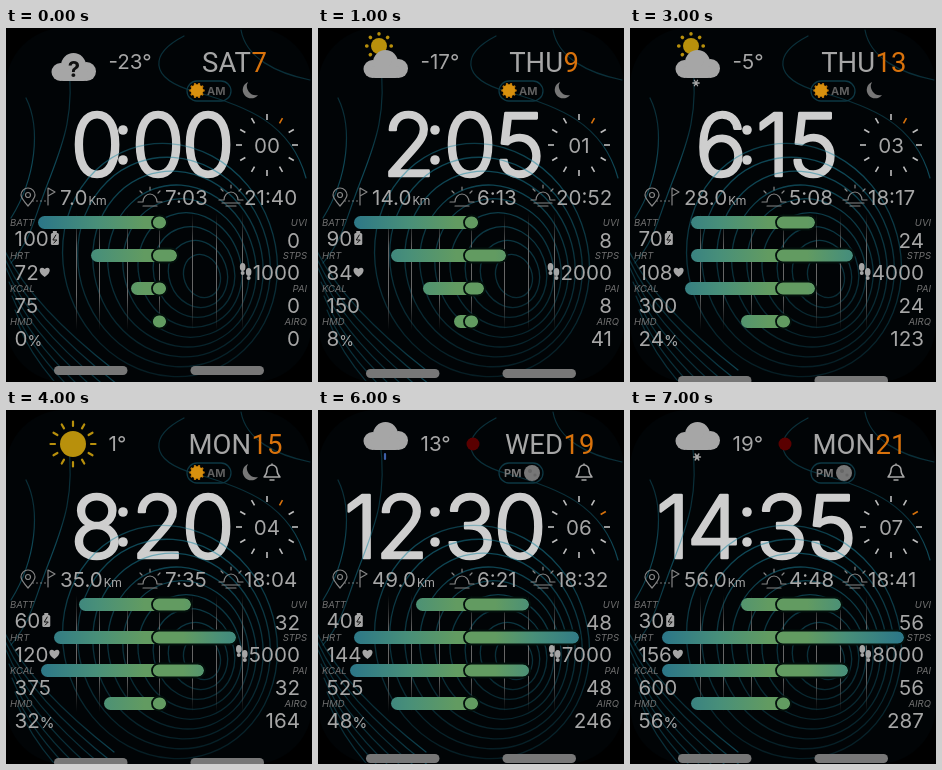
Animation of 306x354 px, one loop 8000 ms. Source, as an HTML page with a canvas:

```html
<!DOCTYPE html>
<html lang="en">
<head>
<meta charset="utf-8">
<style>
  html, body { margin: 0; width: 100%; height: 100%; overflow: hidden; background: #000; }
  canvas { display: block; width: 306px; height: 354px; }
</style>
</head>
<body>
<canvas width="306" height="354"></canvas>
<script>
const canvas = document.querySelector('canvas');
const ctx = canvas.getContext('2d');
const TAU = Math.PI * 2;
const GRAY = '#a6a6a6', DIM = '#858585', YELLOW = '#b8900c', WHITE = '#cecece';

// Values that follow no simple step, one entry per second
const days = ['SAT', 'THU', 'SAT', 'THU', 'MON', 'SAT', 'WED', 'MON'];
const sunrise = ['7:03', '6:13', '4:31', '5:08', '7:35', '7:46', '6:21', '4:48'];
const sunset = ['21:40', '20:52', '19:41', '18:17', '18:04', '18:21', '18:32', '18:41'];
const pillTop = [338, 341, 344, 348, 348, 348, 344, 344];
const bars = [
  { left: [32, 36, 48, 61, 73, 85, 98, 111], right: [160, 160, 160, 185, 185, 211, 211, 211] },
  { left: [85, 73, 67, 61, 48, 42, 36, 32], right: [171, 188, 205, 223, 230, 248, 261, 274] },
  { left: [125, 105, 80, 55, 35, 32, 32, 32], right: [160, 166, 178, 185, 198, 205, 211, 218] },
  { left: [147, 136, 125, 111, 98, 85, 73, 61], right: Array(8).fill(160) }
];

function gradient(x0, y0, x1, y1, stops) {
  const fill = ctx.createLinearGradient(x0, y0, x1, y1);
  stops.forEach(stop => fill.addColorStop(...stop));
  return fill;
}
const barFill = gradient(32, 0, 274, 0,
  [[0, '#2b7688'], [.24, '#488f79'], [.44, '#629b61'], [.6, '#629b61'], [.76, '#488f79'], [1, '#2b7688']]);
const gridFill = gradient(0, 185, 0, 302, [[0, '#5550'], [.3, '#666'], [.7, '#666'], [1, '#5550']]);
const contourStroke = gradient(0, 100, 0, 354,
  [[0, '#1a849e55'], [.15, '#1a849e88'], [.4, '#1a849e66'], [1, '#1a849e30']]);

// Draws text and returns its width
function text(str, x, y, { size = 20.6, weight = 400, color = GRAY, align = 'left', family = 'Inter', style = '' } = {}) {
  ctx.font = `${style} ${weight} ${size}px ${family}, sans-serif`;
  ctx.fillStyle = color;
  ctx.textAlign = align;
  ctx.fillText(str, x, y);
  return ctx.measureText(str).width;
}

function disc(x, y, r, color) {
  ctx.fillStyle = color;
  ctx.beginPath();
  ctx.arc(x, y, r, 0, TAU);
  ctx.fill();
}

function box(x, y, w, h, r, color) {
  ctx.fillStyle = color;
  ctx.beginPath();
  ctx.roundRect(x, y, w, h, r);
  ctx.fill();
}

function path(d, x, y, { fill, stroke, width = 1 } = {}) {
  ctx.save();
  ctx.translate(x, y);
  const shape = new Path2D(d);
  if (fill) { ctx.fillStyle = fill; ctx.fill(shape); }
  if (stroke) {
    ctx.strokeStyle = stroke;
    ctx.lineWidth = width;
    ctx.lineCap = ctx.lineJoin = 'round';
    ctx.stroke(shape);
  }
  ctx.restore();
}

function rays(x, y, inner, outer, count, color, width) {
  ctx.strokeStyle = color;
  ctx.lineWidth = width;
  ctx.lineCap = 'round';
  ctx.beginPath();
  for (let i = 0; i < count; i++) {
    const a = i / count * TAU, c = Math.cos(a), s = Math.sin(a);
    ctx.moveTo(x + c * inner, y + s * inner);
    ctx.lineTo(x + c * outer, y + s * outer);
  }
  ctx.stroke();
}

function cloud(x, y, color = GRAY) {
  disc(x + 9, y + 19, 9, color);
  disc(x + 22, y + 12.5, 12.5, color);
  disc(x + 35, y + 18.5, 9.5, color);
  box(x + 8, y + 16, 28, 12, 4, color);
}

function smallSun() {
  disc(61, 18, 8, YELLOW);
  rays(61, 18, 12, 12.4, 8, YELLOW, 3.4);
}

function weather(s) {
  if (s === 0) {
    cloud(45.5, 25);
    text('?', 68, 49, { size: 22, weight: 700, color: '#111', align: 'center' });
  } else if (s < 4) {
    smallSun();
    cloud(45.5, 22);
    if (s === 2) for (let i = 0; i < 4; i++) path('M0 0v5', 58.5 + i * 6.3, 52, { stroke: '#3d5fa8', width: 2 });
    if (s === 3) rays(66, 55, 0, 3.2, 6, GRAY, 1.3);
  } else if (s === 4) {
    disc(67, 34, 13, YELLOW);
    rays(67, 34, 18, 22.5, 12, YELLOW, 2.2);
  } else if (s === 5) {
    ctx.save();
    ctx.translate(44, 11);
    ctx.scale(.72, .72);
    cloud(0, 0);
    ctx.restore();
    cloud(47, 18.5, '#020609');
    cloud(45.5, 21);
  } else {
    cloud(45.5, 12);
    if (s === 6) path('M0 0v5', 67, 44, { stroke: '#3d5fa8', width: 2.2 });
    else rays(67, 47, 0, 3.4, 6, GRAY, 1.6);
  }
}

// Height lines: tilted rings, diagonals at the lower left and loose curves above
function contours() {
  ctx.strokeStyle = contourStroke;
  ctx.lineWidth = 1.3;
  for (let n = 0; n < 9; n++) {
    ctx.beginPath();
    ctx.ellipse(196 - 4 * n, 248 - 2 * n, 18 + 11 * n, 22 + 12 * n, -.35, 0, TAU);
    ctx.stroke();
  }
  const line = { stroke: contourStroke, width: 1.2 };
  for (let n = 0; n < 7; n++) path('M-14 0Q10 60 100 130', 8 + n * 3, 212 + n * 14, line);
  path('M62 30C70 90 55 120 40 160S25 210 5 235', 0, 0, line);
  path('M20 70C35 100 30 150 5 190', 0, 0, line);
  path('M178 8C145 25 140 50 190 64S285 95 300 150', 0, 0, line);
  path('M235 2C240 30 270 45 304 52', 0, 0, line);
}

function bigTime(hours, minutes) {
  ctx.textAlign = 'left';
  ctx.fillStyle = ctx.strokeStyle = WHITE;
  ctx.font = '300 86px Inter, sans-serif';
  ctx.lineWidth = 2.6;
  ctx.lineJoin = 'round';
  const digits = (str, x) => {
    for (const d of str) {
      const narrow = d === '1';
      const m = ctx.measureText(d);
      const left = x + (narrow ? 13 : 24) - (m.actualBoundingBoxRight - m.actualBoundingBoxLeft) / 2;
      ctx.fillText(d, left, 147.5);
      ctx.strokeText(d, left, 147.5);
      x += narrow ? 32 : 50;
    }
  };
  digits(hours, hours.length > 1 ? 28 : 67);
  digits(minutes, 128);
  disc(117, 102, 4.8, WHITE);
  disc(117, 132, 4.8, WHITE);
}

function secondsDial(s) {
  text('0' + s, 261, 124.5, { align: 'center' });
  ctx.lineCap = 'butt';
  for (let i = 0; i < 12; i++) {
    const a = i / 12 * TAU, active = i === Math.floor(s / 5) + 1;
    ctx.strokeStyle = active ? '#d8720c' : '#bdbdbd';
    ctx.lineWidth = 1.6;
    ctx.beginPath();
    ctx.moveTo(261 + 25 * Math.sin(a), 117 - 25 * Math.cos(a));
    ctx.lineTo(261 + 31 * Math.sin(a), 117 - 31 * Math.cos(a));
    ctx.stroke();
  }
}

function statusIcons(s) {
  ctx.strokeStyle = '#0d3743';
  ctx.lineWidth = 1.3;
  ctx.beginPath();
  ctx.roundRect(181, 53, 44, 20, 10);
  ctx.stroke();
  const label = { size: 11, weight: 700, color: '#606060' };
  if (s < 6) {
    rays(191, 62.5, 4, 6.6, 10, '#c47a08', 2.4);
    disc(191, 62.5, 6.2, '#d8900e');
    text('AM', 201, 67, label);
  } else {
    text('PM', 186, 67, { ...label, color: '#777' });
    disc(214, 63, 8, '#777');
    disc(212, 61, 2, '#666');
    disc(217, 65, 1.6, '#686868');
  }
  if (s < 5) path('M-2-8A8.5 8.5 0 1 0 8 5A9 9 0 0 1-2-8Z', 244, 62, { fill: '#777' });
  if (s > 3) {
    path('M-8 5Q-5 2-5-2A5 5 0 0 1 5-2Q5 2 8 5ZM0-7v-1M-2 8h4', 266, 62, { stroke: GRAY, width: 1.5 });
  }
  if (s > 4) disc(155, 34, 6.5, '#5a0000');
}

function infoRow(s) {
  const line = { stroke: DIM, width: 1.2 };
  path('M0 9Q-7 1-7-2A7 7 0 0 1 7-2Q7 1 0 9ZM-2.5-2a2.5 2.5 0 1 0 5 0a2.5 2.5 0 1 0-5 0', 22, 169, line);
  for (let i = 0; i < 4; i++) disc(27 + i * 4, 173, .8, DIM);
  path('M0 9V-8L7-4L0 0', 42, 168, line);
  const width = text((s + 1) * 7 + '.0', 54, 177);
  text('Km', 55 + width, 177, { size: 12, family: 'Roboto' });

  const sun = 'M-12 5h5A7 8 0 0 1 7 5h5M0-7v-3M-8-4l-2-2M8-4l2-2';
  path(sun + 'M-7 9h14', 144, 169, line);
  path(sun + 'M-9 8h18M-5 11h10', 225, 167, line);
  text(sunrise[s], 159, 177);
  text(sunset[s], 238, 177);
}

function stats(s) {
  const label = { size: 9.5, color: '#707070', style: 'italic' };
  const left = [100 - 10 * s, 72 + 12 * s, 75 + 75 * s, 8 * s];
  const right = [8 * s, 1000 * (s + 1), 8 * s, 41 * s];
  ['BATT', 'HRT', 'KCAL', 'HMD'].forEach((name, i) => text(name, 4, 198 + i * 33, label));
  ['UVI', 'STPS', 'PAI', 'AIRQ'].forEach((name, i) => text(name, 301, 198 + i * 33, { ...label, align: 'right' }));

  const leftEnd = left.map((value, i) => 8.5 + text(value, 8.5, [218, 252, 285, 318][i]));
  const rightWidth = right.map((value, i) => text(value, 294, [220, 252, 285, 318][i], { align: 'right' }));

  box(leftEnd[0] + 2, 205, 8, 12, 1.5, GRAY);
  box(leftEnd[0] + 4, 203, 4, 3, 0, GRAY);
  path('M1-4L-2 1H2L-1 4', leftEnd[0] + 6, 211, { stroke: '#111', width: 1 });
  path('M0 5C-9-1-4-7 0-3C4-7 9-1 0 5Z', leftEnd[1] + 6, 244, { fill: GRAY });
  text('%', leftEnd[3], 318, { size: 15 });

  const x = 294 - rightWidth[1] - 7;
  ctx.fillStyle = GRAY;
  for (const [dx, dy] of [[-3, -2], [3, 3]]) {
    ctx.beginPath();
    ctx.ellipse(x + dx, 241 + dy, 2.8, 4, 0, 0, TAU);
    ctx.fill();
    disc(x + dx, 247 + dy, 2, GRAY);
  }
}

function chart(s) {
  ctx.fillStyle = gridFill;
  for (const x of [70, 93, 121, 153, 186, 210, 236]) ctx.fillRect(x, 185, 1, 117);
  bars.forEach(({ left, right }, i) => {
    const y = 188 + i * 33;
    box(left[s], y, 160 - left[s], 13, 6.5, barFill);
    box(146.5, y, right[s] - 146.5, 13, 6.5, barFill);
    ctx.strokeStyle = '#03100c';
    ctx.lineWidth = 1.8;
    ctx.beginPath();
    ctx.roundRect(146, y - .5, right[s] - 145, 14, 7);
    ctx.stroke();
  });
}

function draw(now) {
  const s = Math.floor(now / 1000) % 8;
  ctx.fillStyle = '#000';
  ctx.fillRect(0, 0, 306, 354);
  box(0, 0, 306, 354, 58, '#010406');

  bigTime(String(2 * s), String(5 * s).padStart(2, '0'));
  ctx.save();
  ctx.beginPath();
  ctx.roundRect(0, 0, 306, 354, 58);
  ctx.clip();
  contours();
  ctx.restore();

  weather(s);
  text(`${6 * s - 23}°`, 102.5, 41);
  text(days[s], 245, 44, { size: 27.5, family: 'Roboto', align: 'right' });
  text(7 + 2 * s, 245.5, 44, { size: 27.5, family: 'Roboto', color: '#d8720c' });
  statusIcons(s);
  secondsDial(s);
  infoRow(s);
  chart(s);
  stats(s);
  for (const x of [48, 184.5]) box(x, pillTop[s], 73.5, 9, 4.5, '#777');
}

function tick() {
  draw(performance.now());
  requestAnimationFrame(tick);
}
tick();
</script>
</body>
</html>
```
